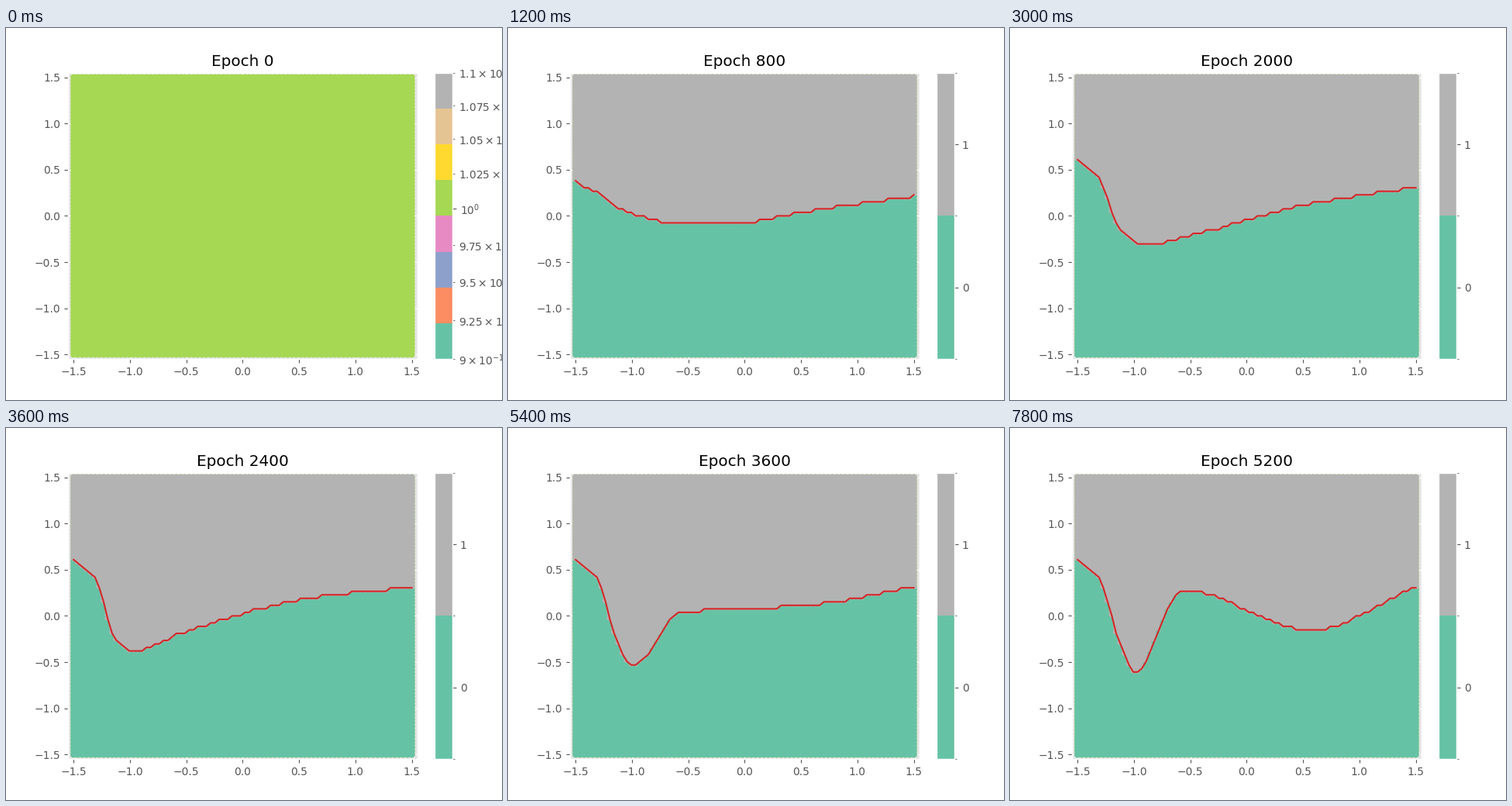
These frames come from a looping animation (640x480 px, 8000 ms). A matplotlib script:

```python
import matplotlib.pyplot as plt
import numpy as np
from matplotlib.animation import FuncAnimation

plt.style.use("ggplot")

N = 80                      # grid points per side
STEP = 3 / (N - 1)
INTERVAL = 100
TICKS_PER_STEP = 3          # a new epoch is shown every 300 ms
EPOCHS_PER_STEP = 200

SET2 = plt.get_cmap("Set2").colors
TEAL, GREEN, GREY = SET2[0], SET2[4], SET2[7]
LINE_RED = "#d62728"

axis = np.linspace(-1.5, 1.5, N)
X, Y = np.meshgrid(axis, axis)


def progress(epoch, start, end):
    return np.clip((epoch - start) / (end - start), 0, 1)


def ease_out(epoch, start, end):
    return np.sin(np.pi / 2 * progress(epoch, start, end))


def ease_in_out(epoch, start, end):
    t = progress(epoch, start, end)
    return t * t * (3 - 2 * t)


def monotone_cubic(px, py, x):
    """Smooth curve through the points that turns only at the points."""
    widths = np.diff(px)
    secants = np.diff(py) / widths
    left, right = secants[:-1], secants[1:]
    same_sign = left * right > 0
    total = np.where(same_sign, left + right, 1)
    inner = np.where(same_sign, 2 * left * right / total, 0)
    slopes = np.concatenate([secants[:1], inner, secants[-1:]])

    i = np.clip(np.searchsorted(px, x) - 1, 0, len(widths) - 1)
    h = widths[i]
    t = (x - px[i]) / h
    blend = t * t * (3 - 2 * t)
    return (py[i] * (1 - blend) + py[i + 1] * blend
            + h * t * (1 - t) * (slopes[i] * (1 - t) - slopes[i + 1] * t))


def boundary(epoch):
    """Decision boundary: a valley digs in on the left, then a wave follows."""
    early = ease_out(epoch, 200, 2000)
    valley_x = -0.3 - 0.69 * ease_out(epoch, 200, 2800)
    points = [
        (-1.5, 0.115 + 0.5 * early),
        (-1.31, 0.095 + 0.315 * early),
        (-1.12, 0.08 - 0.4 * ease_in_out(epoch, 1000, 2800)),
        (valley_x, 0.03 - 0.645 * ease_out(epoch, 200, 5200)),
        (valley_x + 0.42,
         0.04 - 0.25 * early + 0.49 * ease_in_out(epoch, 2000, 5200)),
        (0.56, 0.05 + 0.16 * ease_in_out(epoch, 1200, 2800)
         - 0.365 * ease_in_out(epoch, 2800, 5200)),
        (1.5, 0.12 + 0.19 * early),
    ]
    px, py = np.array(points).T
    return np.round(monotone_cubic(px, py, axis) / STEP) * STEP


fig = plt.figure(figsize=(6.4, 4.8), dpi=100)

BAR_WIDTH = 0.775 * 0.046
PAD = 0.775 * 0.045
ax = fig.add_axes([0.125, 0.11, 0.775 - BAR_WIDTH - PAD, 0.77])
ax.set(xlim=(-1.55, 1.55), ylim=(-1.55, 1.55),
       xticks=np.arange(-3, 4) / 2, yticks=np.arange(-3, 4) / 2)


def color_bar(colors, edges, scale="linear"):
    bar = fig.add_axes([0.9 - BAR_WIDTH, 0.11, BAR_WIDTH, 0.77])
    bar.grid(False)
    bar.set_yscale(scale)
    for color, low, high in zip(colors, edges, edges[1:]):
        bar.axhspan(low, high, facecolor=color, linewidth=0, antialiased=False)
    bar.set(xlim=(0, 1), xticks=[])
    bar.yaxis.tick_right()
    return bar


def scientific(value):
    power = 0 if value >= 1 else -1
    return rf"$\mathdefault{{{value / 10.0 ** power:g}\times10^{{{power}}}}}$"


log_bar = color_bar(SET2, np.geomspace(0.9, 1.1, 9), "log")
log_bar.set_yticks([1], [r"$\mathdefault{10^{0}}$"])
minor = [round(1 + 0.025 * i, 3) for i in range(-4, 5) if i]
log_bar.set_yticks(minor, [scientific(v) for v in minor], minor=True)
log_bar.set_ylim(0.9, 1.1)

class_bar = color_bar([TEAL, GREY], [-0.5, 0.5, 1.5])
class_bar.set_yticks([0, 1], ["0", "1"])
class_bar.set_yticks([-0.5, 0.5, 1.5], minor=True)
class_bar.set_ylim(-0.5, 1.5)


def dot_layer():
    return ax.scatter(X.ravel(), Y.ravel(), s=36, linewidths=0,
                      color=np.tile(GREEN, (N * N, 1)))


# The untrained layer stays below and tints the rim of the later dots.
dot_layer()
dots = dot_layer()
line, = ax.plot([], [], color=LINE_RED, linewidth=1.5)


def update(tick):
    epoch = tick // TICKS_PER_STEP * EPOCHS_PER_STEP
    trained = epoch > 0
    ax.set_title(f"Epoch {epoch}")
    log_bar.set_visible(not trained)
    for artist in (class_bar, dots, line):
        artist.set_visible(trained)
    if trained:
        heights = boundary(epoch)
        labels = (Y > heights).astype(int)
        dots.set_facecolor(np.array([TEAL, GREY])[labels.ravel()])
        line.set_data(axis, heights)
    return []


anim = FuncAnimation(fig, update, frames=80, interval=INTERVAL,
                     repeat=True, repeat_delay=0)
plt.show()
```
